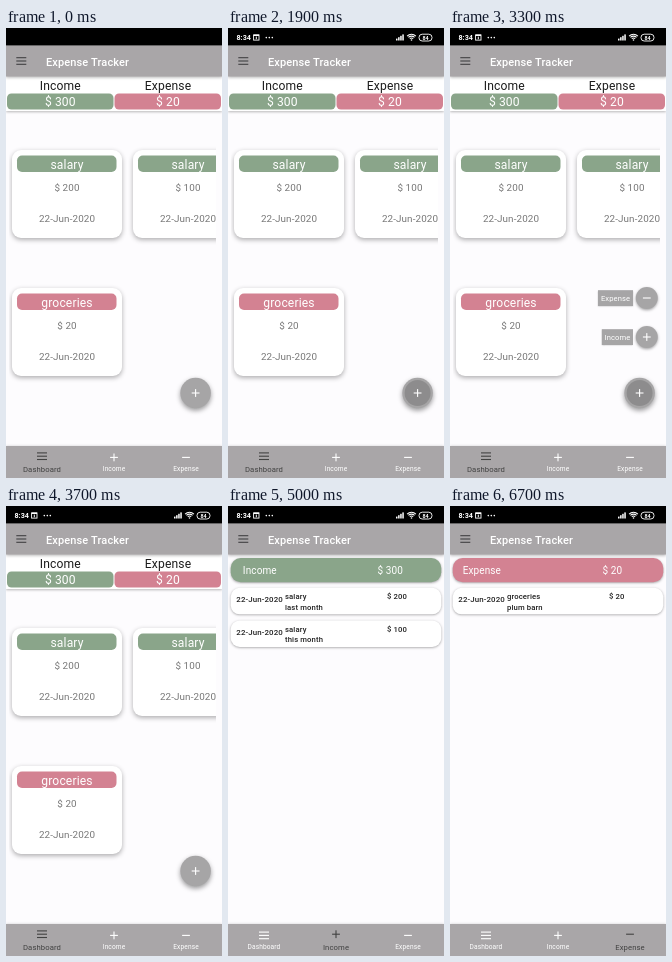
Animation, 216 px wide and 450 px high, one loop 8 s. Source, as an HTML page with a canvas:

```html
<!DOCTYPE html>
<html lang="en">
<head>
<meta charset="utf-8">
<title>Expense Tracker</title>
<style>
html, body { margin: 0; width: 100%; height: 100%; overflow: hidden; background: #fdfcfe; }
canvas { display: block; width: 100vw; height: 100vh; }
</style>
</head>
<body>
<canvas id="stage"></canvas>
<script>
const W = 216, H = 450, LOOP = 8000, STEP = 100;
const GREEN = '#8aa58a', PINK = '#d38292', BAR = '#a9a6a8', GREY = '#a6a5a6';
const PAGE = '#fdfcfe', WHITE = '#fff', DARK = '#424143';
const canvas = document.getElementById('stage');
const ctx = canvas.getContext('2d');

const clamp = v => Math.min(1, Math.max(0, v));
const ramp = (t, from, to) => clamp((t - from) / (to - from));
const mix = (a, b, p) => a + (b - a) * p;

function text(str, x, y, size, color, { align = 'center', weight = 400, gap = 0.1 } = {}) {
  ctx.font = `${weight} ${size}px Roboto, "Noto Sans", sans-serif`;
  ctx.letterSpacing = gap + 'px';
  ctx.textAlign = align;
  ctx.textBaseline = 'alphabetic';
  ctx.fillStyle = color;
  ctx.fillText(str, x, y + size * 0.355);
}

function rect(x, y, w, h, color) {
  ctx.fillStyle = color;
  ctx.fillRect(x, y, w, h);
}

function pill(x, y, w, h, r, color) {
  ctx.fillStyle = color;
  ctx.beginPath();
  ctx.roundRect(x, y, w, h, r);
  ctx.fill();
}

function disc(x, y, r, color) {
  ctx.fillStyle = color;
  ctx.beginPath();
  ctx.arc(x, y, r, 0, Math.PI * 2);
  ctx.fill();
}

function shadowed(blur, dy, alpha, draw) {
  const scale = canvas.width / W;
  ctx.save();
  ctx.shadowColor = `rgba(0,0,0,${alpha})`;
  ctx.shadowBlur = blur * scale;
  ctx.shadowOffsetY = dy * scale;
  draw();
  ctx.restore();
}

function clipped(x, y, w, h, draw) {
  ctx.save();
  ctx.beginPath();
  ctx.rect(x, y, w, h);
  ctx.clip();
  draw();
  ctx.restore();
}

const icons = {
  menu(x, y, color) {
    for (const dy of [-3.3, 0, 3.3]) rect(x - 5, y + dy - 0.55, 10, 1.1, color);
  },
  plus(x, y, color) {
    rect(x - 3.9, y - 0.55, 7.8, 1.1, color);
    rect(x - 0.55, y - 3.9, 1.1, 7.8, color);
  },
  minus(x, y, color) {
    rect(x - 3.9, y - 0.55, 7.8, 1.1, color);
  }
};

function statusBar(alpha) {
  rect(0, 0, W, 17.5, '#000');
  ctx.save();
  ctx.globalAlpha = alpha;
  text('8:34', 8.5, 9.5, 7.2, WHITE, { align: 'left', weight: 700, gap: 0 });
  ctx.strokeStyle = WHITE;
  ctx.lineWidth = 0.9;
  ctx.strokeRect(25.6, 6.9, 5.4, 5.2);
  rect(25.6, 6.6, 5.4, 1.4, WHITE);
  rect(27.8, 8.6, 1, 2.6, WHITE);
  for (let i = 0; i < 3; i++) disc(38.3 + i * 3, 9.6, 0.8, WHITE);
  for (let i = 0; i < 4; i++) rect(168 + i * 2.1, 10.6 - i * 1.4, 1.5, 1.9 + i * 1.4, WHITE);
  ctx.lineWidth = 1.1;
  for (const r of [2.4, 4.3, 6.2]) {
    ctx.beginPath();
    ctx.arc(183.5, 12.4, r, -Math.PI * 0.75, -Math.PI * 0.25);
    ctx.stroke();
  }
  disc(183.5, 12, 0.8, WHITE);
  ctx.lineWidth = 0.9;
  ctx.beginPath();
  ctx.roundRect(191, 6.2, 13, 6.8, 3.2);
  ctx.stroke();
  text('84', 197.5, 9.6, 5.4, WHITE, { weight: 700, gap: 0 });
  ctx.restore();
}

function appBar() {
  shadowed(3, 1, 0.3, () => rect(0, 17.5, W, 31, BAR));
  icons.menu(15.3, 33, DARK);
  text('Expense Tracker', 40, 33.8, 11, WHITE, { align: 'left', weight: 500 });
}

function card(x, y, label, color, amount) {
  const mid = x + 55;
  shadowed(5, 1.8, 0.32, () => pill(x, y, 110, 88, 9, WHITE));
  pill(x + 5, y + 5.5, 99.5, 16.5, 5, color);
  text(label, mid, y + 14.3, 12.1, WHITE, { gap: 0.15 });
  text(amount, mid, y + 37.5, 9.9, '#777');
  text('22-Jun-2020', mid, y + 68, 9.9, '#777');
}

function dashboard() {
  shadowed(2.5, 0.8, 0.28, () => rect(0, 48, W, 35, WHITE));
  text('Income', 54.3, 58, 12.1, '#1c1c1c', { gap: 0.15 });
  text('Expense', 162, 58, 12.1, '#1c1c1c', { gap: 0.15 });
  pill(1, 65.5, 106.5, 16, 4.5, GREEN);
  pill(108.5, 65.5, 106.5, 16, 4.5, PINK);
  text('$ 300', 54.3, 74, 12.1, WHITE);
  text('$ 20', 162, 74, 12.1, WHITE);
  clipped(3, 100, 207, 310, () => {
    card(6, 122, 'salary', GREEN, '$ 200');
    card(127, 122, 'salary', GREEN, '$ 100');
    card(6, 260, 'groceries', PINK, '$ 20');
  });
}

function listPage(title, total, color, rows) {
  shadowed(2.5, 0.8, 0.35, () => pill(2.7, 52, 210.6, 24.3, 10, color));
  text(title, 31.8, 64.2, 10, WHITE);
  text(total, 162.3, 64.2, 10, WHITE);
  const left = { align: 'left', weight: 500, gap: 0.12 };
  rows.forEach(([kind, note, amount], i) => {
    const y = 81.8 + i * 32.6;
    shadowed(2.5, 0.8, 0.35, () => pill(2.7, y, 210.6, 26.5, 9, WHITE));
    text('22-Jun-2020', 8.3, y + 11.7, 7.9, '#222', left);
    text(kind, 57, y + 8.6, 7.7, '#222', left);
    text(note, 57, y + 19.3, 7.7, '#222', left);
    text(amount, 159, y + 8.6, 7.7, '#222', left);
  });
}

const pages = [
  dashboard,
  () => listPage('Income', '$ 300', GREEN, [
    ['salary', 'last month', '$ 200'],
    ['salary', 'this month', '$ 100']
  ]),
  () => listPage('Expense', '$ 20', PINK, [['groceries', 'plum barn', '$ 20']])
];

function floatingButton(press) {
  shadowed(5, 2.2, 0.4, () => disc(189.6, 365, 15.3, GREY));
  if (press > 0) disc(189.6, 365, 13, `rgba(0,0,0,${0.15 * press})`);
  icons.plus(189.6, 365, WHITE);
}

const actions = [
  { label: 'Income', icon: 'plus', top: 298, x: 151.8 },
  { label: 'Expense', icon: 'minus', top: 259, x: 148 }
];

// Each action takes a longer share of the opening and hangs from its top edge.
function speedDial(open) {
  if (open <= 0) return;
  actions.forEach(({ label, icon, top, x }, i) => {
    const grow = clamp(open * actions.length / (i + 1));
    const r = 11 * grow, y = top + r;
    shadowed(3, 1.2, 0.35, () => disc(196.8, y, r, GREY));
    if (grow > 0.8) icons[icon](196.8, y, WHITE);
    if (grow === 1) {
      shadowed(1.5, 0.6, 0.25, () => rect(x, y - 7.8, 183 - x, 15.8, GREY));
      text(label, (x + 183) / 2, y + 0.3, 7.6, WHITE);
    }
  });
}

const tabs = [['Dashboard', 'menu'], ['Income', 'plus'], ['Expense', 'minus']];

function navBar(weights, pressed, ripple) {
  shadowed(3, -0.5, 0.25, () => rect(0, 418, W, 32, BAR));
  if (ripple) {
    clipped(0, 418, W, 32, () =>
      disc(ripple.x, 434, ripple.r, `rgba(0,0,0,${ripple.alpha})`));
  }
  tabs.forEach(([label, icon], i) => {
    const x = 36 + i * 72, p = weights[i];
    const shade = Math.round(mix(255, 66, i === pressed ? 1 : p));
    const color = `rgb(${shade},${shade},${shade})`;
    icons[icon](x, mix(429.4, 428.2, p), color);
    text(label, x, 441, mix(6.6, 7.7, p), color);
  });
}

// Tab taps: press, page swap, end of the label change.
const taps = [
  { from: 0, to: 1, at: 4800, swap: 4900, end: 5000, x: 111, r: 28, alpha: 0.13 },
  { from: 1, to: 2, at: 6400, swap: 6500, end: 6700, x: 180, r: 11, alpha: 0.06 }
];

function draw(t) {
  let page = 0, pressed = -1, ripple = null, weights = [1, 0, 0];
  for (const tap of taps) {
    if (t < tap.at) continue;
    const p = ramp(t, tap.at, tap.end);
    if (t >= tap.swap) page = tap.to;
    weights = [0, 0, 0];
    weights[tap.from] = 1 - p;
    weights[tap.to] = p;
    if (p < 1) {
      pressed = tap.to;
      ripple = { x: tap.x, r: tap.r, alpha: tap.alpha * (1 - p) };
    }
  }

  rect(0, 0, W, H, PAGE);
  pages[page]();
  if (page === 0) {
    const open = ramp(t, 1950, 2300) - ramp(t, 3350, 3700);
    const press = t < 3300
      ? (t >= 1900 ? 1 - ramp(t, 2000, 2400) : 0)
      : 1 - ramp(t, 3400, 3700);
    speedDial(open);
    floatingButton(press);
  }
  appBar();
  statusBar(ramp(t, 200, 900));
  navBar(weights, pressed, ripple);
}

function resize() {
  const dpr = window.devicePixelRatio || 1;
  canvas.width = Math.round(innerWidth * dpr);
  canvas.height = Math.round(innerHeight * dpr);
  ctx.setTransform(canvas.width / W, 0, 0, canvas.height / H, 0, 0);
}

addEventListener('resize', resize);
resize();

const start = performance.now();
function tick() {
  const t = (performance.now() - start) % LOOP;
  draw(Math.floor(t / STEP) * STEP);
  requestAnimationFrame(tick);
}
tick();
</script>
</body>
</html>
```
